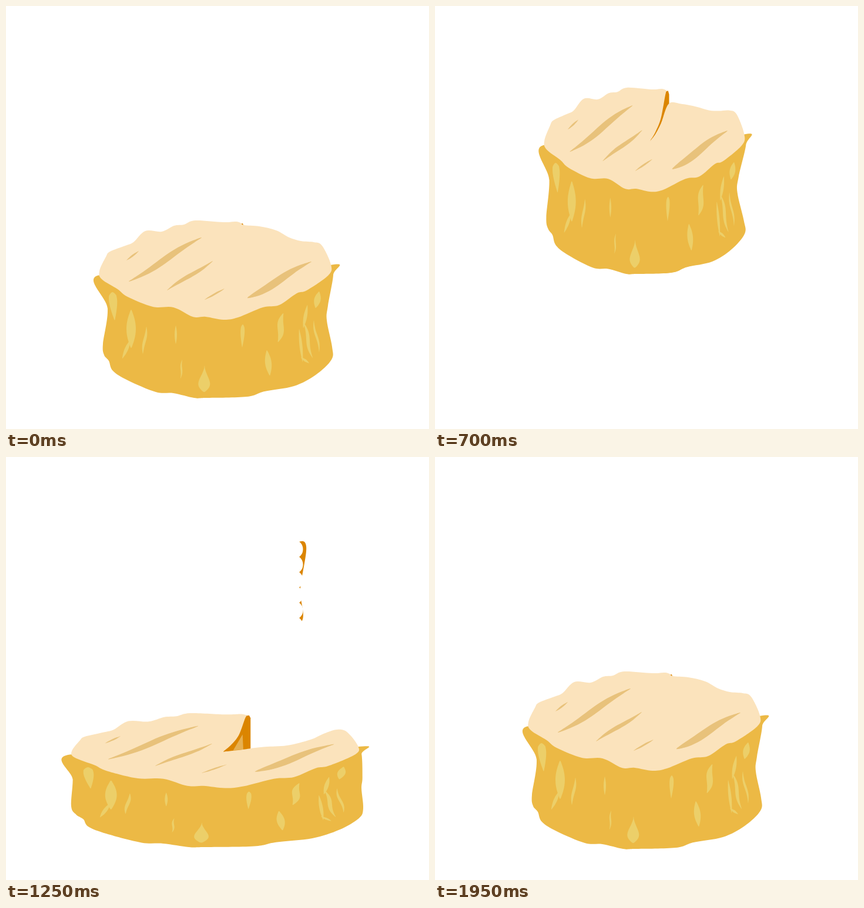
Write an HTML page with a canvas that moves like this. It is 720 by 720 pixels and loops after 2000 ms.

```html
<!DOCTYPE html>
<html lang="en">
<head>
<meta charset="utf-8">
<title>Jumping cheese</title>
<style>
html, body { margin: 0; width: 100%; height: 100%; overflow: hidden; background: #fff; }
canvas { display: block; width: 720px; height: 720px; }
</style>
</head>
<body>
<canvas id="stage" width="720" height="720"></canvas>
<script>
const ctx = document.getElementById('stage').getContext('2d');
const LOOP = 2000, STEP = 50, CX = 357.5, BASE = 667;
const RIND = '#ecb945', CREAM = '#fbe3bc', CREASE = '#e8c27b', DROP = '#eccf69',
      CRUST = '#db8500', PASTE = '#e6b052', WHITE = '#fff', BLACK = '#000';

// time, floor, x scale, y scale
const POSES = [
  [300, 667, 1, 1],
  [450, 664, 1.115, .885],
  [500, 662, 1.114, .887],
  [550, 668, 1, 1.01],
  [600, 625, .9, 1.09],
  [650, 525, .86, 1.09],
  [700, 456, .863, 1.05],
  [750, 449, .863, 1.05],
  [850, 466, .863, 1.05],
  [900, 486, .863, 1.05],
  [1000, 568, .87, 1.06],
  [1100, 662, .97, 1.013],
  [1200, 664, 1.275, .74],
  [1300, 664, 1.2, .77],
  [1400, 664, 1.048, .894],
  [1550, 668, .94, 1.053],
  [1700, 667, 1, 1]
];
// how far the wedge is filled in
const FILL = [[450, 1], [500, 1.04], [550, 1], [700, .75], [750, .75], [800, 0],
              [1350, 0], [1400, .15], [1600, .7], [1900, .97], [1950, 1]];
// slice: time, popped out, vertical shift
const POP = [[800, 0, 30], [850, 0, 4], [900, 0, 0], [950, .45, -10],
             [1000, .8, -9], [1100, 1, 0]];

const BACK = [159,451, 170,427, 177,418, 203,408, 217,402, 237,383, 265,384, 286,374,
  303,372, 322,365, 370,368, 391,367, 399,369];
const FRONT = [524,402, 538,408, 553,440, 549,458, 512,484, 495,489, 465,509, 437,513,
  395,530, 370,534, 340,529, 318,529, 285,513, 250,512, 207,495, 190,482, 163,465];
const CUT = [402,368, 402,368, 398,375, 389,414, 378,437, 367,452, 367,452];
// wedge edge: empty, filled
const EDGE = [
  [378,450, 390,448, 403,445, 425,441, 455,438, 487,425, 506,411],
  [378,437, 389,414, 405,373, 431,375, 460,382, 482,394, 502,400]
];
const SIDE = [552,441, 557,458, 548,510, 546,535, 555,580, 554,602, 527,628, 490,647,
  440,656, 410,665, 340,667, 320,667, 285,659, 255,657, 207,637, 182,621, 175,604, 167,594,
  165,575, 173,515, 160,458, 357,490];

// slice shapes: peeking, popped out
const CHUNK = [
  [364,250, 395,230, 440,191, 488,178, 504,181, 503,220, 501,285, 440,312, 400,318, 366,326],
  [359,189, 400,186, 440,172, 490,147, 511,152, 501,225, 502,282, 440,297, 400,303, 364,311]
];
const FACE = [
  [367,260, 392,249, 415,223, 440,209, 491,199, 488,280, 450,305, 405,312, 366,318],
  [362,205, 395,200, 418,192, 440,183, 493,165, 488,268, 450,285, 405,288, 363,293]
];
const LID = [
  [364,250, 374,174, 388,142, 408,127, 430,131, 455,145, 485,156, 504,180, 488,178, 440,191, 395,231],
  [359,188, 378,157, 388,128, 407,110, 430,113, 455,122, 490,131, 503,139, 480,151, 440,172, 400,186]
];
// x, y, rx, ry, tilt
const FEATURES = [
  [WHITE, [413,243,20,9,-.4], [406,235,20,35,.08]],
  [BLACK, [403,248,6,3,-.4], [398,222,7,11,.35]],
  [WHITE, [464,217,23,11,-.25], [465,219,20.5,36.5,.05]],
  [BLACK, [476,214,7,4,-.35], [469.5,200.5,7.5,10,-.1]],
  ['#8f4f00', [436,231,5,2,-.5], [438,200,11,2,-.33]],
  [BLACK, [442,239,7,4.5,-.35], [435,263,8,20.5,0]]
];

const lerp = (a, b, k) => a + (b - a) * k;
const mix = ([a, b], k) => a.map((v, i) => lerp(v, b[i], k));
const clamp = (v, lo, hi) => Math.max(lo, Math.min(hi, v));

function at(rows, t) {
  if (t <= rows[0][0]) return rows[0].slice(1);
  for (let i = 1; i < rows.length; i++) {
    const a = rows[i - 1], b = rows[i];
    if (t <= b[0]) return mix([a, b], (t - a[0]) / (b[0] - a[0])).slice(1);
  }
  return rows[rows.length - 1].slice(1);
}

// closed smooth curve through flat x,y pairs
function blob(p, color) {
  const n = p.length / 2;
  const X = i => p[(i + n) % n * 2], Y = i => p[(i + n) % n * 2 + 1];
  ctx.beginPath();
  ctx.moveTo(X(0), Y(0));
  for (let i = 0; i < n; i++) {
    ctx.bezierCurveTo(
      X(i) + (X(i + 1) - X(i - 1)) / 6, Y(i) + (Y(i + 1) - Y(i - 1)) / 6,
      X(i + 1) - (X(i + 2) - X(i)) / 6, Y(i + 1) - (Y(i + 2) - Y(i)) / 6,
      X(i + 1), Y(i + 1));
  }
  ctx.fillStyle = color;
  ctx.fill();
}

function poly(p, color) {
  ctx.beginPath();
  for (let i = 0; i < p.length; i += 2) ctx.lineTo(p[i], p[i + 1]);
  ctx.fillStyle = color;
  ctx.fill();
}

function oval(color, x, y, rx, ry, tilt = 0) {
  ctx.beginPath();
  ctx.ellipse(x, y, rx, ry, tilt, 0, Math.PI * 2);
  ctx.fillStyle = color;
  ctx.fill();
}

// tapered streak from one point to another; skew moves its widest part
function streak(color, x1, y1, x2, y2, w, wave = 0, skew = 1) {
  const dx = x2 - x1, dy = y2 - y1, len = Math.hypot(dx, dy), n = 10, p = [];
  const add = (i, dir) => {
    const k = i / n;
    const off = wave * Math.sin(2 * Math.PI * k) +
      dir * w / 2 * Math.abs(Math.sin(Math.PI * k ** skew)) ** .85;
    p.push(x1 + dx * k - dy / len * off, y1 + dy * k + dx / len * off);
  };
  for (let i = 0; i < n; i++) add(i, 1);
  for (let i = n; i > 0; i--) add(i, -1);
  blob(p, color);
}

function drawDrops() {
  const drop = (...a) => streak(DROP, ...a);
  drop(181, 487, 185, 535, 14, 0, .55);
  drop(213, 517, 213, 582, 16);
  drop(212, 568, 198, 600, 6);
  drop(239, 546, 233, 592, 5, -1);
  drop(289, 544, 289, 575, 4);
  drop(300, 602, 297, 634, 3, 1);
  drop(338, 612, 337, 657, 20, 0, 1.9);
  drop(403, 542, 402, 581, 7, 0, .6);
  drop(472, 523, 463, 572, 11, 2);
  drop(444, 586, 449, 629, 11);
  drop(513, 509, 506, 548, 6);
  drop(506, 538, 522, 599, 6, -2);
  drop(499, 550, 505, 606, 5);
  drop(502, 598, 516, 608, 4);
  drop(524, 535, 533, 589, 4, 1.5);
  drop(533, 486, 527, 514, 11);
}

function drawCreases() {
  const crease = (...a) => streak(CREASE, ...a);
  crease(205, 433, 226, 417, 3);
  crease(209, 469, 333, 394, 11, 2);
  crease(274, 484, 352, 434, 7, -1);
  crease(338, 500, 372, 481, 3);
  crease(411, 497, 520, 435, 13, 2, .8);
}

function strand(x, w, top, end, foot) {
  const n = w * .4;
  blob([x - w, top, x - n, top + 18, x - n, end - 35, x - foot, end,
        x + foot, end, x + n, end - 35, x + n, top + 18, x + w, top], PASTE);
}

function drawBites(t) {
  oval(WHITE, 368, 228, 15, 15);
  oval(WHITE, 363, 246, 9, 10);
  oval(WHITE, 370, 261, 8, 5);
  oval(WHITE, 364, 281, 8, 6);
  if (t === 1100) return;
  const edge = 365 + (t - 1100) * .85;
  ctx.fillRect(330, 80, edge - 330, 300);
  for (let y = 105; y < 380; y += 26) oval(WHITE, edge, y, 13, 15);
}

function drawSlice(t, floor, sy) {
  const [pop, dy] = at(POP, t);
  const lift = dy + (1 - pop) * 20;
  const whole = t <= 1100;
  if (pop > 0) {
    const reach = y => whole ? floor + (y - BASE) * sy + 8 : 350;
    strand(414.5, 11, 286 + lift, reach(444), whole ? 12 : 3);
    strand(452, 6.5, 281 + lift, reach(438), whole ? 8 : 2);
  }
  ctx.save();
  ctx.translate(0, dy);
  blob(mix(CHUNK, pop), CRUST);
  blob(mix(FACE, pop), PASTE);
  blob(mix(LID, pop), CREAM);
  if (pop > 0) {
    const len = Math.min(86, (t - 900) * .43);
    strand(477, 7, 271, 271 + len, 2);
    oval(PASTE, 477, 263 + len, 5, 9);
    strand(414.5, 11, 284, 325, 4.5);
    strand(452, 6.5, 279, 318, 2.6);
  }
  for (const [color, ...shapes] of FEATURES) oval(color, ...mix(shapes, pop));
  if (pop > .5) oval('#3a2000', 433, 245, 7, 1.5);
  ctx.restore();
  if (t >= 1100) drawBites(t);
}

function draw(t) {
  const [floor, sx, sy] = at(POSES, t);
  const [fill] = at(FILL, t);
  const wl = sx < 1 ? 1 - (1 - sx) * 2.5 : clamp(1 - (sx - 1) * 7, 0, 1);
  const wr = clamp(1 + (1 - sx) * 7, .1, 1.5);
  const cakeSpace = () => ctx.setTransform(sx, 0, 0, sy, CX * (1 - sx), floor - BASE * sy);
  ctx.setTransform(1, 0, 0, 1, 0, 0);
  ctx.fillStyle = WHITE;
  ctx.fillRect(0, 0, 720, 720);

  cakeSpace();
  poly([399,371, 403,370, 405,376, 405,447, 367,453], CRUST);
  poly([394,413, 381,449, 395,447], PASTE);

  ctx.setTransform(1, 0, 0, 1, 0, 0);
  if (t >= 800 && t < 1300) drawSlice(t, floor, sy);

  cakeSpace();
  const side = SIDE.map((v, i) => {
    const y = SIDE[i + 1];
    if (i % 2 || y < 455 || y > 600 || (v > 180 && v < 530)) return v;
    const pinch = 13 * Math.sin(Math.PI * (y - 455) / 145);
    return v < CX ? v + (wl - 1) * pinch : v - (wr - 1) * pinch;
  });
  blob(side, RIND);
  drawDrops();
  blob([...BACK, ...(fill < 1 ? CUT : []), ...mix(EDGE, fill).slice(fill < 1 ? 0 : 4), ...FRONT], CREAM);
  drawCreases();
}

const start = performance.now();
function tick() {
  const t = (performance.now() - start) % LOOP;
  draw(Math.floor(t / STEP) * STEP);
  requestAnimationFrame(tick);
}
tick();
</script>
</body>
</html>
```
